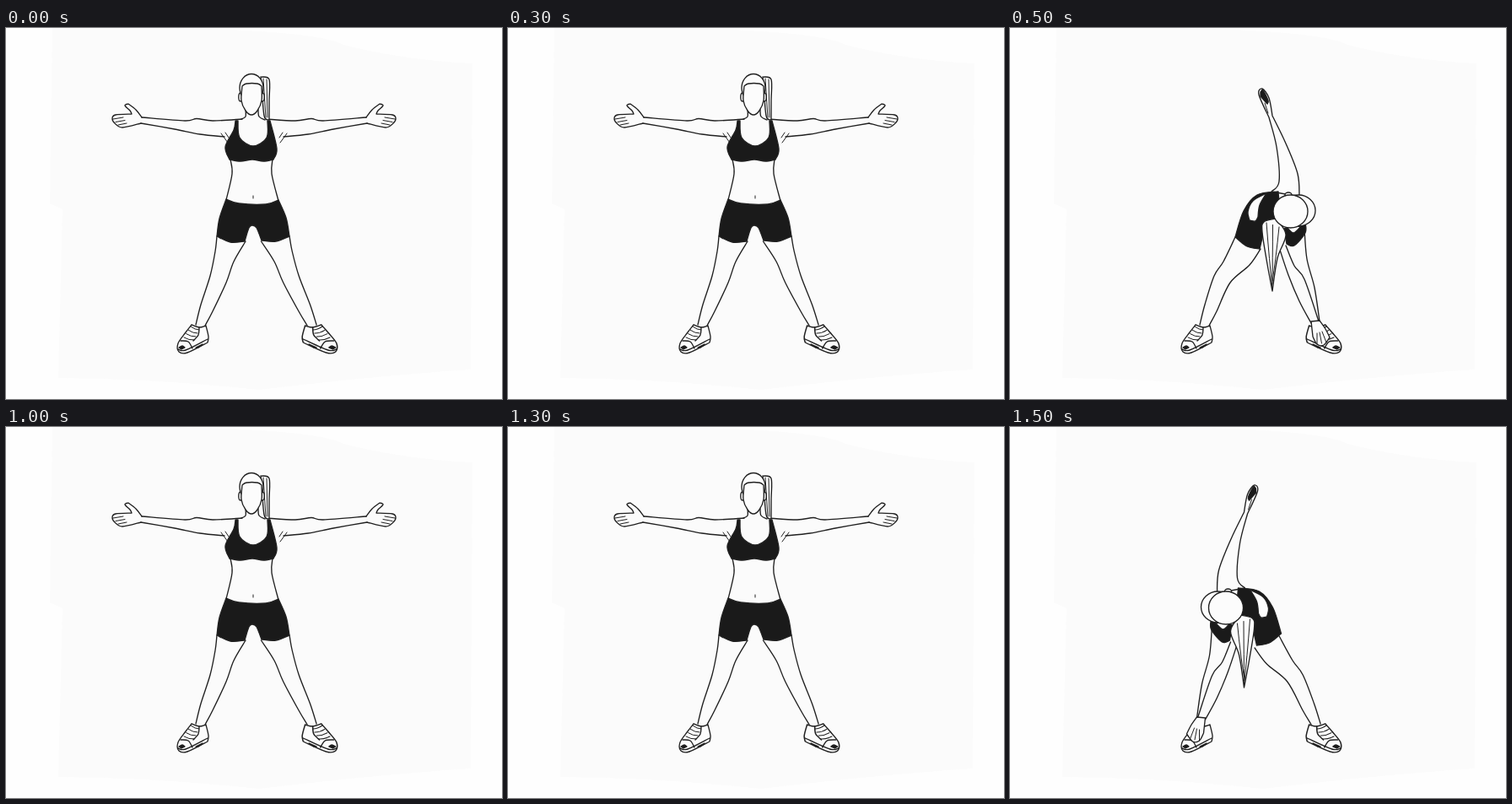
An HTML page for the animation above (2000 ms loop, 588 px wide and 440 px high).

```html
<!DOCTYPE html>
<html lang="en">
<head>
<meta charset="utf-8">
<title>Standing windmill exercise</title>
<style>
html, body { margin: 0; width: 100%; height: 100%; overflow: hidden; background: #fefefe; }
svg { display: block; width: 588px; height: 440px; }
path, ellipse { fill: none; stroke: #202020; stroke-width: 1.35; stroke-linecap: round; stroke-linejoin: round; }
.skin { fill: #fcfcfc; }
.cloth { fill: #1a1a1a; }
.thin { stroke-width: 1; }
.paper { fill: #fbfbfb; stroke: none; }
.flip-arm { transform: matrix(-1, 0, 0, 1, 588, 0); }
.flip-leg { transform: matrix(-1, 0, .067, 1, 569.5, 0); }
.flip-shoe { transform: matrix(-1.13, 0, 0, 1, 622.4, 0); }
.flip-fold { transform: matrix(-1, 0, 0, 1, 588.5, -3); }
.pose { animation: 2s step-end infinite; }
#stand { animation-name: stand; }
#right { animation-name: right; }
#left { animation-name: left; }
@keyframes stand { 0%, 50% { visibility: visible } 25%, 75%, 100% { visibility: hidden } }
@keyframes right { 0%, 50%, 100% { visibility: hidden } 25% { visibility: visible } }
@keyframes left { 0% { visibility: hidden } 75%, 100% { visibility: visible } }
</style>
</head>
<body>
<svg viewBox="0 0 588 440">
  <defs>
    <g id="shoe"></g><g id="arm"></g><g id="leg"></g><g id="bentLeg"></g><g id="fold"></g>
  </defs>
  <path class="paper" d="M55 0Q360-3 400 20Q470 38 553 42L551 405Q430 413 300 429Q180 416 62 415L67 215L52 208Z"/>
  <g id="stand" class="pose">
    <use href="#leg"/><use href="#leg" class="flip-leg"/>
    <use href="#arm"/><use href="#arm" class="flip-arm"/>
    <g id="body"></g>
  </g>
  <g id="right" class="pose"><use href="#bentLeg"/></g>
  <g id="left" class="pose"><use href="#bentLeg" class="flip-leg"/></g>
  <use href="#shoe"/><use href="#shoe" class="flip-shoe"/>
  <g class="pose" style="animation-name: right"><use href="#fold"/></g>
  <g class="pose" style="animation-name: left"><use href="#fold" class="flip-fold"/></g>
</svg>
<script>
let layer;
const into = id => layer = document.getElementById(id);

function add(tag, kind, attrs) {
  const el = document.createElementNS('http://www.w3.org/2000/svg', tag);
  el.setAttribute('class', kind);
  for (const k in attrs) el.setAttribute(k, attrs[k]);
  layer.append(el);
}

// Smooth curve through key points; "|" marks a sharp corner.
function curve(kind, text) {
  let d = '', last;
  for (const part of text.split('|')) {
    const p = part.trim().split(/\s+/).map(s => s.split(',').map(Number));
    if (last) p.unshift(last);
    else d = 'M' + p[0];
    for (let i = 0; i + 1 < p.length; i++) {
      const a = p[i - 1] || p[i], b = p[i], c = p[i + 1], e = p[i + 2] || c;
      const c1 = b.map((v, k) => v + (c[k] - a[k]) / 6);
      const c2 = c.map((v, k) => v - (e[k] - b[k]) / 6);
      d += 'C' + [c1, c2, c].join(' ');
    }
    last = p.at(-1);
  }
  add('path', kind, { d: d + (kind === 'line' ? '' : 'Z') });
}

const oval = (cx, cy, rx, ry) => add('ellipse', 'skin', { cx, cy, rx, ry });

// n strokes spread evenly from edge a-b to edge c-d, bowed by `bend`.
function fan(n, a, b, c, d, bend = 0) {
  const mix = (p, q, t) => p.map((v, k) => v + (q[k] - v) * t);
  for (let i = 0; i < n; i++) {
    const t = n > 1 ? i / (n - 1) : .5, s = mix(a, b, t), e = mix(c, d, t), m = mix(s, e, .5);
    add('path', 'thin', { d: `M${s}Q${m[0]} ${m[1] + bend} ${e}` });
  }
}

function leg(id, hip, crotch) {
  into(id);
  curve('line', `${hip} 242,294 231,328 225,352`);
  curve('line', `${crotch} 261,302 245,336 236,353`);
}
leg('leg', '250,247 248,265', '284,253 270,277');
leg('bentLeg', '267,248 253,277', '297,262 284,281');

into('shoe');
curve('skin', '220,352 213,361 204,374 205,384 215,385 239,373 | 240,366 237,353 | 229,355 220,352');
curve('line', '204,381 213,382 239,369');
curve('line', '207,371 216,372 221,380');
curve('cloth', '205,379 209,377 212,379 | 208,381');
curve('cloth', '225,379 233,375 | 228,379');
fan(4, [219, 354], [211, 367], [229, 358], [223, 370], 2);
curve('line', '229,355 228,364 222,371');

into('arm');
curve('line', '280,108 245,110 226,107.5 212,110 161,106');
curve('line', '259,129 230,126 200,120 160,113');
curve('line', '161,106 154,97 145,90 | 141,92 147,98 149,102 | 130,103 126,107 129,113 138,118 160,113');
fan(3, [127, 108], [133, 115], [139, 106], [143, 113]);
fan(2, [255, 125], [260, 124], [263, 136], [264, 130]);

into('body');
curve('line', '266,156 268,173 261,204');
curve('line', '316,156 315,173 323,205');
curve('line', '284,96 284,105 279,108');
curve('line', '299,97 300,105 307,109');
fan(1, [293, 199], [293, 199], [293, 202], [293, 202]);
curve('skin', '302,58 312,61 312,86 312,109 | 306,104 303,66');
fan(2, [305, 60], [309, 61], [308, 106], [310, 106]);
oval(278, 82, 2.2, 5);
oval(304, 82, 2.2, 5);
oval(291, 71, 14, 16.5);
curve('skin', '280,69 285,66 298,66 303,69 | 303,86 298,98 291,103 284,98 279,86 280,69');
curve('cloth', '272,110 270,121 260,141 265,156 | 278,158 292,156 305,158 317,156 | 321,143 313,110 | 310,110 | 309,130 293,140 277,130 275,110');
curve('cloth', '261,203 | 276,208 308,209 323,204 | 332,225 336,247 | 320,253 303,252 | 297,237 292,234 288,237 283,253 | 266,254 250,247 | 253,226 261,203');

// Folded body reaching down to one foot, other arm raised
into('fold');
curve('line', '319,260 330,293 343,324 357,350');
curve('line', '327,258 337,282 349,298 366,348');
curve('line', '349,238 352,274 361,308 367,348');
curve('skin', '357,348 359,366 | 364,375 372,376 379,367 | 374,357 367,347');
fan(3, [364, 375], [375, 373], [364, 362], [370, 360]);
curve('skin', '307,106 316,141 319,182 310,194 | 343,200 | 341,173 327,137 311,104 | 307,83 299,72 295,79 307,106');
curve('cloth', '297,76 300,74 306,86 305,90 | 297,81');
fan(1, [302, 89], [302, 89], [306, 101], [306, 101]);
curve('cloth', '318,194 293,198 277,217 267,248 | 281,259 296,262 | 302,236 | 319,230 318,194');
curve('skin', '304,196 288,205 282,218 284,228 | 291,229 294,224 | 296,210 304,196');
curve('cloth', '325,238 350,231 | 350,243 337,258 328,256');
curve('skin', '328,236 336,243 345,235');
curve('skin', '315,226 301,230 299,242 305,280 311,312 | 317,273 327,245 315,226');
fan(3, [304, 231], [319, 236], [311, 308], [311, 300], 8);
oval(330, 198, 4, 3);
oval(342, 216.5, 20, 18.5);
oval(332.5, 217.5, 20.5, 19.5);
</script>
</body>
</html>
```
